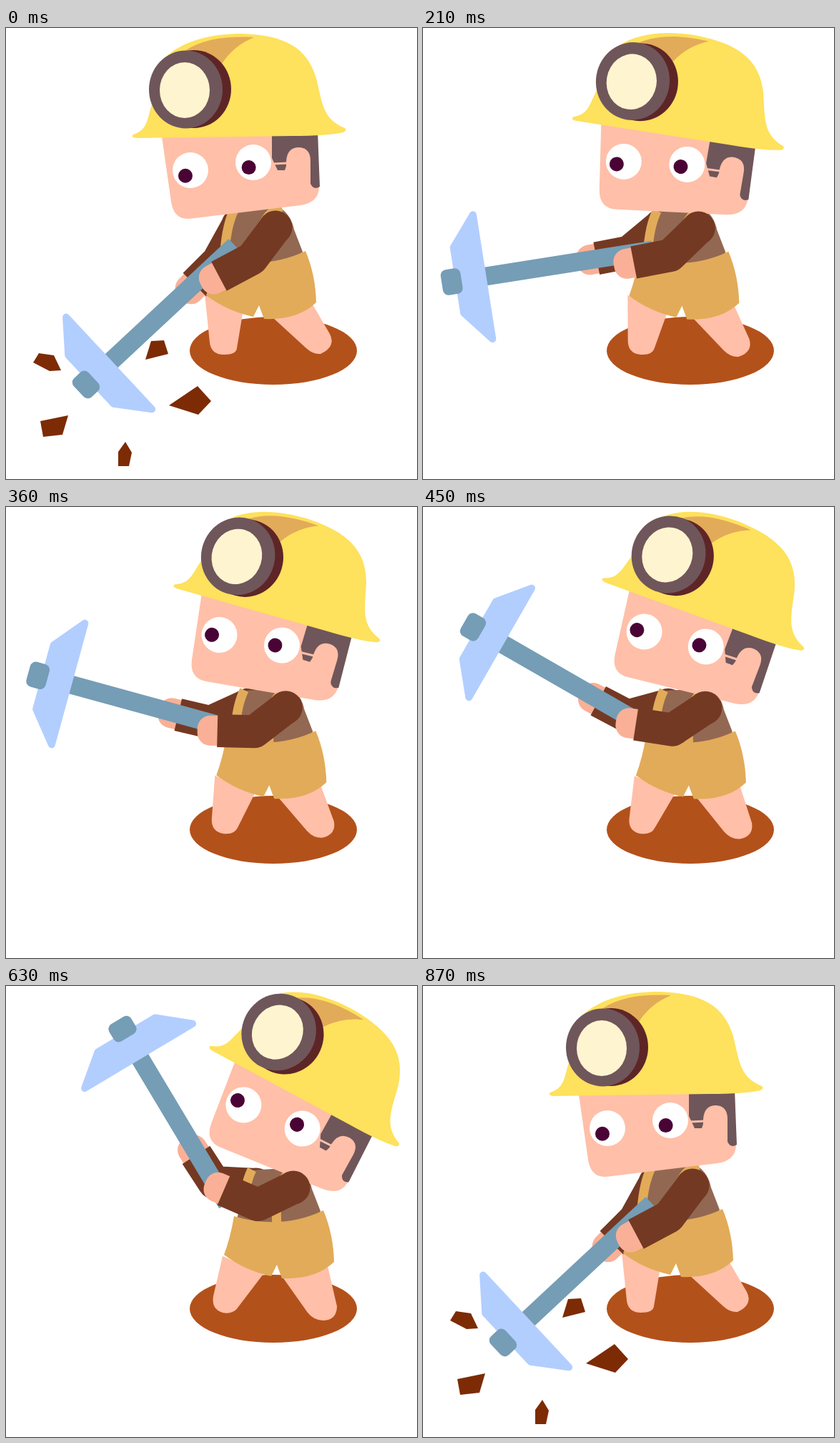
These frames come from a looping animation (575x631 px, 0.9 s). An HTML page with a canvas:

```html
<!DOCTYPE html>
<html lang="en">
<head>
<meta charset="utf-8">
<title>Miner</title>
<style>
html, body { margin: 0; width: 100%; height: 100%; overflow: hidden; background: #fff; }
canvas { display: block; }
</style>
</head>
<body>
<canvas id="stage" width="575" height="631"></canvas>
<script>
const ctx = document.getElementById('stage').getContext('2d');
const LOOP = 900, STEP = 30;
const SKIN = '#ffbfa8', HAND = '#f9b096', SLEEVE = '#743923', OCHRE = '#e2ab59',
      YELLOW = '#fee15c', STEEL = '#759db5', BLADE = '#b2ceff', GREY = '#6f565a';
const rad = Math.PI / 180;
const mix = (a, b, p) => a + (b - a) * p;
const arc = p => 4 * p * (1 - p);

function fill(path, color) {
  ctx.fillStyle = color;
  ctx.fill(typeof path === 'string' ? new Path2D(path) : path);
}

function ellipse(x, y, rx, ry, color) {
  const path = new Path2D();
  path.ellipse(x, y, rx, ry, 0, 0, 7);
  fill(path, color);
}

function box(x, y, w, h, r, color) {
  const path = new Path2D();
  path.roundRect(x, y, w, h, r);
  fill(path, color);
}

function line(path, width, color) {
  ctx.lineWidth = width;
  ctx.strokeStyle = color;
  ctx.stroke(new Path2D(path));
}

// Draw in a frame moved to (x, y) and turned by deg
function within(x, y, deg, draw) {
  ctx.save();
  ctx.translate(x, y);
  ctx.rotate(deg * rad);
  draw();
  ctx.restore();
}

// Steady lift, quick strike, short rest on the ground
function swing(t, midStrike) {
  const keys = [[0, 0], [690, 1.095], [750, midStrike], [810, 0], [LOOP, 0]];
  const i = keys.findIndex(k => k[0] > t);
  const [t0, v0] = keys[i - 1], [t1, v1] = keys[i];
  return mix(v0, v1, (t - t0) / (t1 - t0));
}

// Points: hip, ankle, control, sole, control, ankle, hip
function leg(low, high, p) {
  const n = low.map((v, i) => mix(v, high[i], p));
  fill(`M${n.slice(0, 2)} L${n.slice(2, 4)} Q${n.slice(4, 8)} Q${n.slice(8, 12)} L${n.slice(12)}Z`, SKIN);
}

function legs(p) {
  leg([278, 372, 285, 440, 287, 457, 305, 457, 322, 457, 323, 448, 331, 400],
      [303, 378, 290, 434, 287, 452, 303, 457, 318, 460, 325, 449, 360, 403], p);
  leg([372, 404, 420, 448, 430, 457, 440, 456, 462, 446, 453, 428, 425, 380],
      [386, 406, 422, 457, 431, 468, 444, 468, 463, 467, 463, 448, 450, 392], p);
}

function arm(x, y, upper, upperDeg, fore, foreDeg) {
  const ex = x + upper * Math.cos(upperDeg * rad), ey = y + upper * Math.sin(upperDeg * rad);
  const wx = ex + fore * Math.cos(foreDeg * rad), wy = ey + fore * Math.sin(foreDeg * rad);
  within(wx, wy, foreDeg, () => box(-6, -21, 34, 42, [4, 18, 18, 4], HAND));
  line(`M${x},${y} L${ex},${ey} L${wx},${wy}`, 46, SLEEVE);
  ellipse(x, y, 23.5, 23.5, SLEEVE);
}

function body() {
  fill('M312,256 L384,252 Q399,262 403,282 L415,313 L400,335 L296,335Z', '#926852');
  line('M319,255 Q309,275 306,312', 13, OCHRE);
  line('M386,251 Q349,260 354,334', 13, OCHRE);
  fill('M294,320 Q360,340 419,312 Q433,345 434,384 Q408,409 361,407 L354,388 L346,404 Q309,396 280,374 Q289,350 294,320Z', OCHRE);
}

function pick(p) {
  within(320.4 - 11 * p + 5.5 * arc(p), 304.6 + 6.7 * arc(p), -43 + 102.1 * p, () => {
    box(-240, -13, 240, 26, 0, STEEL);
    const blade = 'M-275,-47 L-241,-88 V88 L-275,46Z';
    fill(blade, BLADE);
    line(blade, 10, BLADE);
    box(-299, -18, 28, 36, 8, STEEL);
  });
}

function eye(x, y, reach, p) {
  const look = (132 + 56 * p) * rad;
  ellipse(x, y, 25, 25, '#fff');
  ellipse(x + reach * Math.cos(look), y + reach * Math.sin(look), 10, 10, '#4a0335');
}

function head(p) {
  within(358, 326 + 3.3 * arc(p), 29.1 * p, () => {
    ctx.translate(-358, -326);
    fill('M217,145 L231,243 Q235,270 260,266.5 L412,248 Q438,244 438,222 L436,145Z', SKIN);
    fill('M372,145 H436 L439,222 Q429,228 425,215 V190 H393 L390,199 H380 L372,182Z', GREY);
    line('M374,190 L395,189', 3, SKIN);
    fill('M392,205 V187 Q393,167 410,167 Q426,168 426,186 V222 H392Z', SKIN);
    eye(258, 199, 10.5, p);
    eye(346, 188, 9.5, p);
    fill('M178,149 C194,144 197,133 200,121 L222,42 C248,17 288,8 330,8 C390,10 421,27 434,70 C443,108 444,128 474,140 Q478,143 472,146 Q450,151 400,151 L182,154 Q174,153 178,149Z', YELLOW);
    fill('M250,32 C276,15 309,11 347,13 Q318,25 302,50 L265,45Z', OCHRE);
    ellipse(263, 85.5, 52, 54.5, '#5e2527');
    ellipse(251.5, 86, 51.5, 54.5, GREY);
    ellipse(250, 87, 35, 39, '#fff4d0');
  });
}

const rocks = [
  [58, 467, 'M-20,1 L-12,-12 L9,-9 L19,12 L3,13Z'],
  [211, 450, 'M-8,-12 L10,-13 L16,6 L-16,14Z'],
  [258, 522, 'M10,-21 L29,0 L11,19 L-30,6Z'],
  [68, 557, 'M-20,-7 L19,-15 L11,12 L-16,15Z'],
  [166, 597, 'M1,-18 L10,-3 L6,16 L-9,16 V-4Z']
];

function debris(t) {
  if (t > 90 && t < 810) return;
  const age = t >= 810 ? t - 810 : t + 60;
  const spread = age < 60 ? 0.5 + age / 120 : 1 + (age - 60) * 0.003;
  for (const [x, y, shape] of rocks)
    within(mix(165, x, spread), mix(530, y, spread), 0, () => fill(shape, '#7d2b05'));
}

function draw(t) {
  const lean = swing(t, 0.524), lift = swing(t, 0.592);
  ctx.clearRect(0, 0, 575, 631);
  ctx.lineJoin = 'round';
  ellipse(374, 451.5, 117, 47.5, '#b3511b');
  legs(lean);
  arm(325 + 25 * lean, 275 + 3 * lean, 59, 119 + 64 * lift, 46, 135 + 102 * lift);
  within(25 * lean, 2 * lean, 0, body);
  debris(t);
  pick(lift);
  head(lean);
  arm(377 + 25 * lean, 279 + 3 * lean, 55, 127 + 27 * lift, 52, 152 + 51.4 * lift);
}

const start = performance.now();
function tick() {
  const t = (performance.now() - start) % LOOP;
  draw(Math.floor(t / STEP) * STEP);
  requestAnimationFrame(tick);
}
tick();
</script>
</body>
</html>
```
